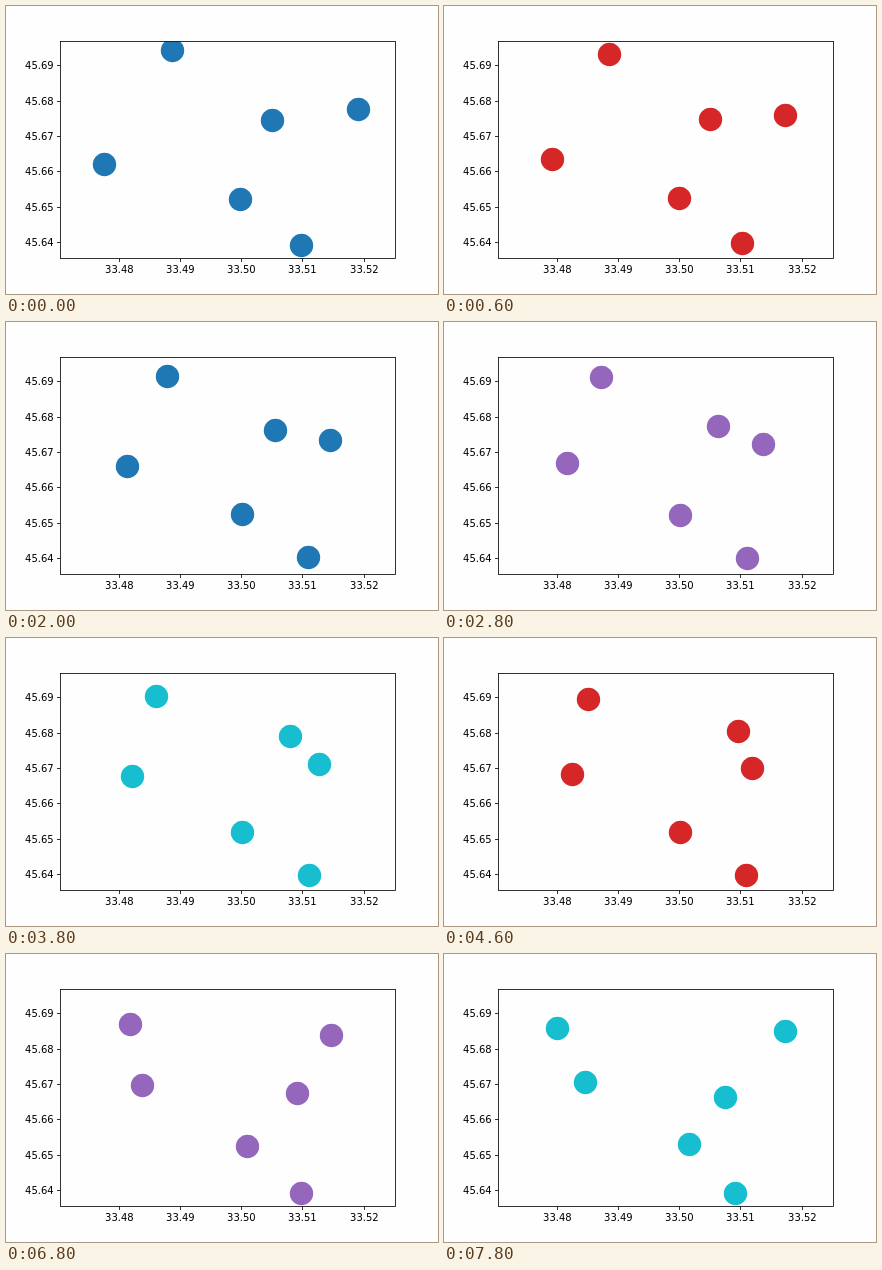
These frames come from a looping animation (432x288 px, 8 s). An HTML page:

```html
<!DOCTYPE html>
<html lang="en">
<head>
<meta charset="utf-8">
<title>Moving scatter plot</title>
<style>
  html, body { margin: 0; width: 100%; height: 100%; overflow: hidden; background: #fefefe; }
  svg { display: block; width: 432px; height: 288px; }
  text { font: 10px "DejaVu Sans", sans-serif; fill: #000; }
  .axes { fill: none; stroke: #000; stroke-width: 0.8; }
</style>
</head>
<body>
<svg viewBox="0 0 432 288">
  <clipPath id="plot"><rect x="54" y="35.5" width="335.5" height="217"/></clipPath>
  <g id="dots" clip-path="url(#plot)"></g>
  <g id="ticks"></g>
  <rect class="axes" x="54.5" y="35.5" width="335" height="217"/>
</svg>
<script>
const STEP = 200, STEPS = 40, RADIUS = 11.7;
const COLORS = ['#1f77b4', '#ff7f0e', '#2ca02c', '#d62728', '#9467bd',
                '#8c564b', '#e377c2', '#7f7f7f', '#bcbd22', '#17becf'];

// A few way points [x, y] per dot; one more dot keeps the sum of all positions constant
const KEYS = [0, 7, 14, 28, 39];
const PATHS = [
  [[166.7, 44.5], [163.5, 52.5], [157.5, 55.5], [135.5, 65.2], [113.5, 74.5]],
  [[266.5, 114.5], [267.5, 110.5], [274.5, 104.5], [308.5, 87.3], [341.5, 77.5]],
  [[352.9, 103.5], [329.5, 115.5], [319.5, 122.5], [301.9, 134.3], [281.5, 143.5]],
  [[98.5, 158.5], [117.5, 147.5], [123.5, 141.5], [131.5, 134.5], [141.5, 128.5]],
  [[234.5, 193.5], [236.5, 192.5], [236.5, 193.5], [237.9, 194.3], [245.5, 190.5]]
];
const TOTAL = [1415, 854];

function add(parent, tag, attrs, text = '') {
  const node = document.createElementNS('http://www.w3.org/2000/svg', tag);
  for (const name in attrs) node.setAttribute(name, attrs[name]);
  node.textContent = text;
  return parent.appendChild(node);
}

// Slopes of the parabolas through neighbouring way points
function slopes(values) {
  const last = KEYS.length - 1;
  const rate = i => (values[i + 1] - values[i]) / (KEYS[i + 1] - KEYS[i]);
  const inner = i => {
    const before = KEYS[i] - KEYS[i - 1], after = KEYS[i + 1] - KEYS[i];
    return (rate(i - 1) * after + rate(i) * before) / (before + after);
  };
  return values.map((_, i) =>
    i === 0 ? 2 * rate(0) - inner(1) :
    i === last ? 2 * rate(last - 1) - inner(last - 1) : inner(i));
}

function curve(values) {
  const slope = slopes(values);
  return step => {
    let i = 0;
    while (i < KEYS.length - 2 && step >= KEYS[i + 1]) i++;
    const span = KEYS[i + 1] - KEYS[i], u = (step - KEYS[i]) / span, v = 1 - u;
    return v * v * (1 + 2 * u) * values[i] + u * u * (1 + 2 * v) * values[i + 1]
         + u * v * span * (v * slope[i] - u * slope[i + 1]);
  };
}

const ticks = document.getElementById('ticks');
for (let i = 0; i < 5; i++) {
  const x = Math.round(112.8 + 61.2 * i);
  add(ticks, 'path', { class: 'axes', d: `M${x + 0.5} 252.5v3.5` });
  add(ticks, 'text', { x: x - 13.9, y: 267 }, (33.48 + i / 100).toFixed(2));
}
for (let i = 0; i < 6; i++) {
  const y = Math.round(59.2 + 35.4 * i);
  add(ticks, 'path', { class: 'axes', d: `M54.5 ${y + 0.5}h-3.5` });
  add(ticks, 'text', { x: 19.1, y: y + 4 }, (45.69 - i / 100).toFixed(2));
}

const group = document.getElementById('dots');
const circles = Array.from({ length: PATHS.length + 1 }, () => add(group, 'circle', { r: RADIUS }));
const curves = [0, 1].map(axis => PATHS.map(path => curve(path.map(point => point[axis]))));

function draw(now) {
  const step = Math.floor(now / STEP) % STEPS;
  group.setAttribute('fill', COLORS[step % COLORS.length]);
  ['cx', 'cy'].forEach((name, axis) => {
    const places = curves[axis].map(at => at(step));
    places.push(places.reduce((rest, place) => rest - place, TOTAL[axis]));
    // Dots sit on whole pixels
    circles.forEach((circle, i) => circle.setAttribute(name, Math.floor(places[i]) + 0.5));
  });
}

const start = performance.now();
function tick() {
  draw(performance.now() - start);
  requestAnimationFrame(tick);
}
tick();
</script>
</body>
</html>
```
